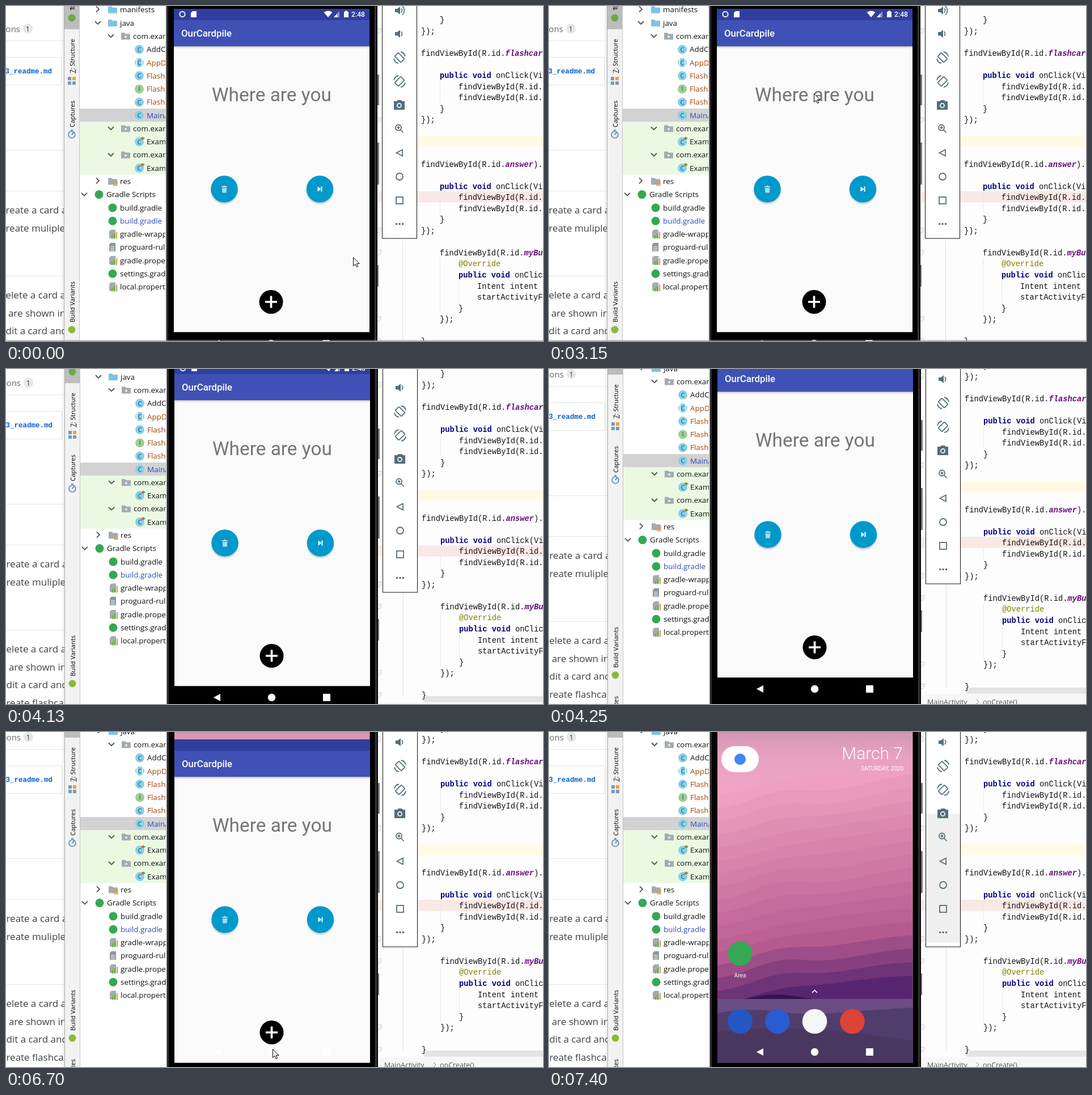
An HTML page that plays this animation: 947 px wide and 591 px high, repeating every 8 s.

```html
<!DOCTYPE html>
<html lang="en">
<head>
<meta charset="utf-8">
<title>Flashcard demo</title>
<style>
html, body { margin: 0; width: 100%; height: 100%; overflow: hidden; background: #fff; }
svg { display: block; width: 947px; height: 591px; }
text { white-space: pre; }
.ui { font: 13.4px "Open Sans", sans-serif; }
.side { font: 11.2px "Open Sans", sans-serif; text-anchor: end; }
.page { font: 17px "Open Sans", sans-serif; fill: #3c4146; }
.code { font: 13.75px "Liberation Mono", monospace; fill: #111; }
.key { font-weight: bold; fill: #000080; }
.field { font-weight: bold; font-style: italic; fill: #660e7a; }
.app { font-family: Roboto, sans-serif; }
.tool { fill: none; stroke: #546e7a; stroke-width: 1.8; }
</style>
</head>
<body>
<svg id="stage" viewBox="0 0 947 591"></svg>
<script>
const LOOP = 8000;
const rect = (x, y, w, h, fill, extra = '') =>
  `<rect x="${x}" y="${y}" width="${w}" height="${h}" fill="${fill}" ${extra}/>`;
const disc = (x, y, r, fill, extra = '') =>
  `<circle cx="${x}" cy="${y}" r="${r}" fill="${fill}" ${extra}/>`;
const path = (d, fill, extra = '') => `<path d="${d}" fill="${fill}" ${extra}/>`;
const line = (d, stroke, width = 1) =>
  path(d, 'none', `stroke="${stroke}" stroke-width="${width}"`);
const text = (x, y, s, cls, extra = '') =>
  `<text x="${x}" y="${y}" class="${cls}" ${extra}>${s}</text>`;
const group = (s, extra = '') => `<g ${extra}>${s}</g>`;

function webPage() {
  const rows = [[366, 'reate a card a'], [398, 'reate muliple'], [516, 'elete a card a'],
    [548, ' are shown in'], [579, 'dit a card and'], [611, 'reate flashcar']];
  return rect(0, 0, 104, 640, '#fff')
    + text(25, 46, 'ions', 'page', 'text-anchor="end" style="fill:#666;font-size:15px"')
    + rect(30, 31, 17, 18, '#e6e7e9', 'rx="9"')
    + text(38.5, 45, '1', 'ui', 'text-anchor="middle" fill="#333" style="font-size:12px"')
    + line('M0 61.5H103M0 90.5H97.5V139.5H0M0 254.5H103M0 326.5H103M0 476.5H103', '#e1e4e8')
    + text(81, 119, '3_readme.md', 'code',
      'text-anchor="end" style="font-size:12.5px;font-weight:bold;fill:#0a5fd0"')
    + rows.map(([y, s]) => text(-0.5, y, s, 'page')).join('');
}

function sideStrip() {
  const label = (y, s) => text(0, 0, s, 'side', `transform="translate(121 ${y}) rotate(-90)"`);
  return rect(98, -10, 4, 650, '#000', 'opacity=".05"')
    + rect(102, -10, 28, 650, '#f2f2f2') + rect(103, -10, 26, 51, '#bdbdbd')
    + line('M102.5 -10V640', '#a6a6a6') + line('M129.5 -10V640', '#c4c4c4')
    + label(-40, '1: Project')
    + text(0, 0, '1:', 'side', 'transform="translate(121 -3) rotate(-90)"')
    + disc(116, 21, 6.5, '#69ab46')
    + label(58, '<tspan text-decoration="underline">7</tspan>: Structure')
    + rect(109, 125, 6, 6, '#8796a2') + rect(117, 125, 6, 6, '#e0a35c')
    + rect(109, 133, 6, 6, '#6e9fc0') + rect(117, 133, 6, 6, '#8796a2')
    + label(167, 'Captures')
    + disc(116, 227, 6, '#dcecf6', 'stroke="#6b8596" stroke-width="1.6"')
    + line('M116 227L119 223M114 219H118', '#3c7fb0', 1.6)
    + label(486, 'Build Variants') + disc(116, 571, 6.5, '#8fb83a')
    + label(608, '2: Favorites');
}

function treeIcon(kind, x, y) {
  const letter = c => text(x, y + 4, c, 'ui', 'text-anchor="middle" fill="#234a5c" style="font-size:11px"');
  const folder = c => path(`M${x - 8} ${y - 6}h6l2 2h8v10h-16z`, c);
  const sheet = c => path(`M${x - 3} ${y - 8}h8v15h-11v-12z`, c);
  switch (kind) {
    case 'folder': return folder('#7cc3e8');
    case 'package': return folder('#a3abb1') + disc(x, y + 1, 2, '#e8ecee');
    case 'res': return folder('#a3abb1') + line(`M${x + 1} ${y + 1}h8m-8 3h8m-8 3h8`, '#d9a343', 1.8);
    case 'class': return disc(x, y, 8, '#86d0ea') + letter('C');
    case 'abstract': return disc(x, y, 8, '#86d0ea')
      + line(`M${x - 5} ${y - 8}v16M${x + 5} ${y - 8}v16`, '#fff', 1.4) + letter('C');
    case 'interface': return disc(x, y, 8, '#9ccf8f') + letter('I');
    case 'test': return disc(x, y, 8, '#86d0ea') + letter('C')
      + path(`M${x + 2} ${y - 6}l4 -3v6z`, '#d8623c') + path(`M${x + 10} ${y - 6}l-4 -3v6z`, '#59a84b');
    case 'gradle': return disc(x, y, 7.5, '#35a853');
    case 'chart': return sheet('#a3abb1')
      + line(`M${x - 1} ${y + 8}v-6M${x + 3} ${y + 8}v-9`, '#62b543', 2.5)
      + line(`M${x + 7} ${y + 8}v-12`, '#e0a35c', 2.5);
    default: return sheet('#8b979f') + line(`M${x - 4} ${y - 1}h7m-7 3h7m-7 3h7`, '#fff');
  }
}

function projectTree() {
  const brown = '#a5430a', blue = '#2a4cb8';
  const rows = [
    ['manifests', 201, 'folder', '', '>'], ['java', 201, 'folder', '', 'v'],
    ['com.exam', 224, 'package', '', 'v'], ['AddCa', 248, 'class'],
    ['AppDa', 248, 'abstract', brown], ['Flashca', 248, 'class', brown],
    ['Flashca', 248, 'interface', brown], ['Flashca', 248, 'class', brown],
    ['MainAc', 248, 'class', blue], ['com.exam', 224, 'package', '', 'v'],
    ['Examp', 248, 'test'], ['com.exam', 224, 'package', '', 'v'], ['Examp', 248, 'test'],
    ['res', 201, 'res', '', '>'], ['Gradle Scripts', 177, 'gradle', '', 'v'],
    ['build.gradle', 201, 'gradle'], ['build.gradle', 201, 'gradle', blue],
    ['gradle-wrapp', 201, 'chart'], ['proguard-rul', 201, 'sheet'],
    ['gradle.prope', 201, 'chart'], ['settings.gradl', 201, 'gradle'], ['local.propert', 201, 'chart']];
  return rect(130, -10, 155, 650, '#fff') + rect(130, 181, 155, 23.5, '#d2d2d2')
    + rect(130, 204.5, 155, 93, '#ebf9e3')
    + rows.map(([name, x, kind, color, arrow], i) => {
      const y = 6.7 + 23.28 * i, a = x - 39;
      return treeIcon(kind, x - 13, y) + text(x, y + 4.7, name, 'ui', `fill="${color || '#111'}"`)
        + (arrow ? line(arrow === '>' ? `M${a - 3} ${y - 6}l5 5l-5 5` : `M${a - 5} ${y - 3}l5 5l5 -5`, '#555', 1.9) : '');
    }).join('');
}

function editor() {
  const find = 'findViewById(R.id.', click = 'public void onClick(Vi';
  const lines = [[-3, 1, '}'], [-2, 0, '});'], [0, 0, find + '*flashcar*'], [2, 1, click],
    [3, 2, find], [4, 2, find], [5, 1, '}'], [6, 0, '});'], [10, 0, find + '*answer*).'],
    [12, 1, click], [13, 2, find], [14, 2, find], [15, 1, '}'], [16, 0, '});'],
    [18, 1, find + '*myBu*'], [19, 2, '@Override'], [20, 2, 'public void onClic'],
    [21, 3, 'Intent intent '], [22, 3, 'startActivityF'], [23, 2, '}'], [24, 1, '});'], [26, 0, '}']];
  const paint = s => s.replace('public void', '<tspan class="key">$&</tspan>')
    .replace(/\*(\w+)\*/, '<tspan class="field">$1</tspan>')
    .replace('@Override', '<tspan fill="#808000">$&</tspan>');
  const folds = [44, 201, 396, 435, 552, 591]
    .map(y => line(`M655 ${y - 4}h6v5l-3 3h-3M656 ${y}h3`, '#c4c4c4')).join('');
  return rect(655, -10, 300, 650, '#fdfdfd')
    + rect(725, 229, 230, 19.5, '#fffae3') + rect(656, 327, 300, 19.5, '#fae8e4')
    + line('M699.5 -10V593', '#e0e0e0')
    + line('M765.5 132V171M765.5 327V366M765.5 445V543M798.5 484V523', '#e9e9e9') + folds
    + rect(735, 593, 220, 11, '#e4e4e4') + rect(655, 605, 300, 40, '#f7f7f7')
    + lines.map(([n, tab, s]) => text(732 + 33 * tab, 88 + 19.55 * n, paint(s), 'code')).join('')
    + text(666, 623, 'MainActivity', 'ui', 'fill="#555" style="font-size:12.5px"')
    + line('M753 614l4 4l-4 4', '#777')
    + text(764, 623, 'onCreate()', 'ui', 'fill="#555" style="font-size:12.5px"');
}

function toolbar() {
  const ink = '#546e7a';
  const speaker = y => path(`M686 ${y - 3}h4l5 -4v14l-5 -4h-4z`, ink);
  const turn = (y, flip) => group(
    '<rect x="-4.5" y="-7.5" width="9" height="15" rx="1" transform="rotate(-45)"/><path d="M2 -10A10 10 0 0 1 10 -2M-2 10A10 10 0 0 1 -10 2"/>',
    `class="tool" transform="translate(694 ${y}) scale(${flip} 1)"`);
  return rect(663.5, -20, 61, 430, '#fff', 'stroke="#111"')
    + rect(664, 176, 60, 226, '#efefef', 'id="shade"')
    + speaker(8) + line('M697 4q3 4 0 8M699 0q7 8 0 16', ink, 1.7)
    + speaker(49) + line('M697 45q3 4 0 8', ink, 1.7)
    + turn(91, 1) + turn(133, -1)
    + path('M684 168h5l2 -2h6l2 2h4v15h-19z', ink) + disc(693.5, 175.5, 4.4, '#fff') + disc(693.5, 175.5, 2.7, ink)
    + `<g class="tool"><circle cx="692" cy="214.5" r="5"/><path d="M695.5 218l5 5.5M689.5 214.5h5M692 212v5"/>
       <path d="M699 253.5v11l-10.5 -5.5z"/><circle cx="694" cy="301" r="6"/><rect x="688" y="337" width="12" height="12"/></g>`
    + [688.5, 694, 699.5].map(x => disc(x, 384.5, 1.8, ink)).join('');
}

function cardApp() {
  const fab = (x, icon) => disc(x, 326, 24, '#000', 'opacity=".13"')
    + disc(x, 323, 23.8, '#0099cc') + group(icon, `transform="translate(${x} 323)"`);
  const question = (id, s) => text(468.4, 168, s, 'app',
    `id="${id}" text-anchor="middle" font-size="33.4" fill="#757575"`);
  const status = disc(311, 14.5, 4.6, 'none', 'stroke="#dfe3f5" stroke-width="2.2"')
    + path('M329 9h7v11h-10v-8z', '#fff')
    + path('M560.5 11q8 -5 15 0l-7.5 9z', '#fff')
    + path('M578 20l10 -11v11z', '#8d98cf') + path('M578 20l6 -6.5v6.5z', '#fff')
    + path('M596 10h2v-1.5h4v1.5h2v10h-8z', '#fff')
    + text(609, 19, '2:48', 'app', 'font-size="12.2" font-weight="500" fill="#fff"');
  return rect(296, 5, 345, 570.5, '#fafafa') + rect(296, 71, 345, 1.5, '#000', 'opacity=".22"')
    + rect(296, 72.5, 345, 2, '#000', 'opacity=".07"')
    + rect(296, 25, 345, 46, '#3f51b5') + rect(296, 5, 345, 20, '#303f9f')
    + group(status, 'id="status"')
    + text(309, 54, 'OurCardpile', 'app', 'font-size="16.8" font-weight="500" fill="#fff"')
    + question('ask', 'Where are you') + question('reply', 'Indiana')
    + fab(385, path('M-5 -5h3l1 -1.5h2l1 1.5h3v2h-10zM-4.3 -2h8.6l-.6 8.5h-7.4z', '#a9d9ea'))
    + fab(553.5, path('M-4 -4.5l6 4.5l-6 4.5z', '#fff') + rect(2, -4.5, 2, 9, '#fff'))
    + disc(467.5, 522, 21, '#000') + line('M467.5 511.5v21M457 522h21', '#fff', 3.7);
}

const mix = (a, b, k) => `rgb(${a.map((v, i) => Math.round(v + (b[i] - v) * k)).join()})`;

function homeScreen() {
  const pink = [238, 160, 192], rose = [184, 92, 144], plum = [88, 38, 112], turn = .74;
  let bands = '';
  for (let i = 0; i < 17; i++) {
    const y = 112 + i * 23, k = i / 16;
    const color = k < turn ? mix(pink, rose, k / turn) : mix(rose, plum, (k - turn) / (1 - turn));
    bands += path(`M297 ${y}C360 ${y - 8} 380 ${y - 30 - 8 * Math.sin(i)} 450 ${y - 32}S560 ${y - 48} 641 ${y - 62 + 12 * k}V590H297z`, color);
  }
  const apps = [[337, '#2457c5'], [403, '#2a5bd0'], [468.5, '#f5f5f5'], [535, '#db4437']];
  const dock = disc(337, 391, 21.5, '#34a853')
    + text(337, 433, 'Area', 'app', 'text-anchor="middle" font-size="10.2" fill="#fff"')
    + line('M464 460l4.5 -4.5l4.5 4.5', '#fff', 1.7)
    + apps.map(([x, c]) => disc(x, 510.5, 21.8, c)).join('');
  return '<linearGradient id="sky" x1="0" y1="0" x2="0" y2="1"><stop offset="0" stop-color="#b98aa2"/><stop offset=".05" stop-color="#d498b4"/><stop offset=".11" stop-color="#e8a1c1"/><stop offset=".2" stop-color="#f0a3c2"/></linearGradient>'
    + rect(297, -26, 345, 611, 'url(#sky)') + bands
    + path('M330 474Q380 462 405 463T480 474z', '#35134f')
    + rect(297, 471, 345, 114, '#6a4d84')
    + path('M297 496Q350 486 400 493T500 496T642 486V585H297z', '#513d6b')
    + path('M297 530Q420 510 642 545V585H297z', '#493760')
    + rect(304, 25, 66, 46, '#fff', 'rx="23"') + disc(337, 48, 10, '#4285f4')
    + text(624, 48, 'March 7', 'app', 'text-anchor="end" font-size="30" font-weight="300" fill="#fff"')
    + text(625, 68, 'SATURDAY, 2020', 'app', 'text-anchor="end" font-size="10" fill="#fff"')
    + group(dock, 'id="dock"');
}

function phone() {
  const settled = s => group(s, 'transform="translate(-1 31)"');
  return rect(281, -20, 2, 660, '#c8c8c8') + rect(283, -20, 372, 660, '#0a0a0a')
    + rect(284, -20, 2, 660, '#333') + rect(650, -20, 3, 660, '#333') + rect(286, -20, 363, 660, '#000')
    + rect(655, 121, 3, 54, '#777') + rect(655, 241, 3, 74, '#777') + rect(655, 457, 2, 38, '#777')
    + '<clipPath id="screen"><rect x="296" y="5" width="344.5" height="610"/></clipPath>'
    + group(settled(homeScreen()) + group(cardApp(), 'id="app"')
      + rect(296, 575.5, 345, 40, '#000', 'id="navbar"')
      + settled(rect(437, 544, 63, 40, '#fff', 'rx="20" id="ripple"')
        + path('M378 558v13l-12 -6.5z', '#fff') + disc(468.5, 564.5, 6.7, '#fff') + rect(559, 558, 13, 13, '#fff', 'rx="1"')),
      'clip-path="url(#screen)"');
}

document.getElementById('stage').innerHTML =
  group(webPage() + sideStrip() + projectTree() + editor() + toolbar() + phone(), 'id="world"')
  + rect(0, 589.5, 947, 1, '#999', 'id="edge"')
  + path('M.5 .5V15.5L4 12.3L6.4 17.6L8.7 16.6L6.4 11.5H11.2z', '#fff', 'id="cursor" stroke="#000"');

// Each track holds its value until the next step.
function track(id, steps) {
  const frames = steps.map(([t, style]) => ({ ...style, offset: t / LOOP, easing: 'steps(1, end)' }));
  frames.push({ ...steps[steps.length - 1][1], offset: 1 });
  document.getElementById(id).animate(frames, { duration: LOOP, iterations: Infinity });
}
const move = (x, y) => ({ transform: `translate(${x}px, ${y}px)` });
const show = (opacity, more) => ({ opacity, ...more });
const at = (t, x, y, opacity = 1) => [t, show(opacity, move(x, y))];
const pill = (x, width) => ({ x: x + 'px', width: width + 'px' });

track('cursor', [at(0, 612, 443), at(750, 539, 415), at(900, 473, 196), at(1020, 427, 177),
  at(2580, 460, 155), at(2720, 467, 154), at(3300, 602, 1), at(3450, 602, 1, 0),
  at(4560, 496, 462), at(4680, 490, 482), at(4800, 484, 504), at(4950, 479, 526),
  at(5070, 473, 545), at(5200, 468, 556), at(5340, 470, 559), at(7280, 753, 145), at(7400, 753, 145, 0)]);
track('world', [[0, move(0, 0)], [4130, move(1, -16)], [4250, move(1, -31)]]);
track('edge', [[0, show(1)], [4130, show(0)]]);
track('ask', [[0, show(1)], [1980, show(0)], [3150, show(1)]]);
track('reply', [[0, show(0)], [1980, show(1)], [3150, show(0)]]);
track('ripple', [[0, show(0, pill(448, 41))], [5340, show(.1, pill(445, 47))],
  [5460, show(.18, pill(437, 63))], [6020, show(.2, pill(433, 72))], [6430, show(0, pill(433, 72))]]);
track('app', [at(0, 0, 0), at(6700, 0, 39), at(6820, 0, 39, 0)]);
track('status', [[0, show(1)], [6700, show(0)]]);
track('navbar', [[0, show(1)], [6700, show(0)]]);
track('dock', [[0, show(.5)], [6980, show(1)]]);
track('shade', [[0, show(0)], [7280, show(1)]]);
</script>
</body>
</html>
```
